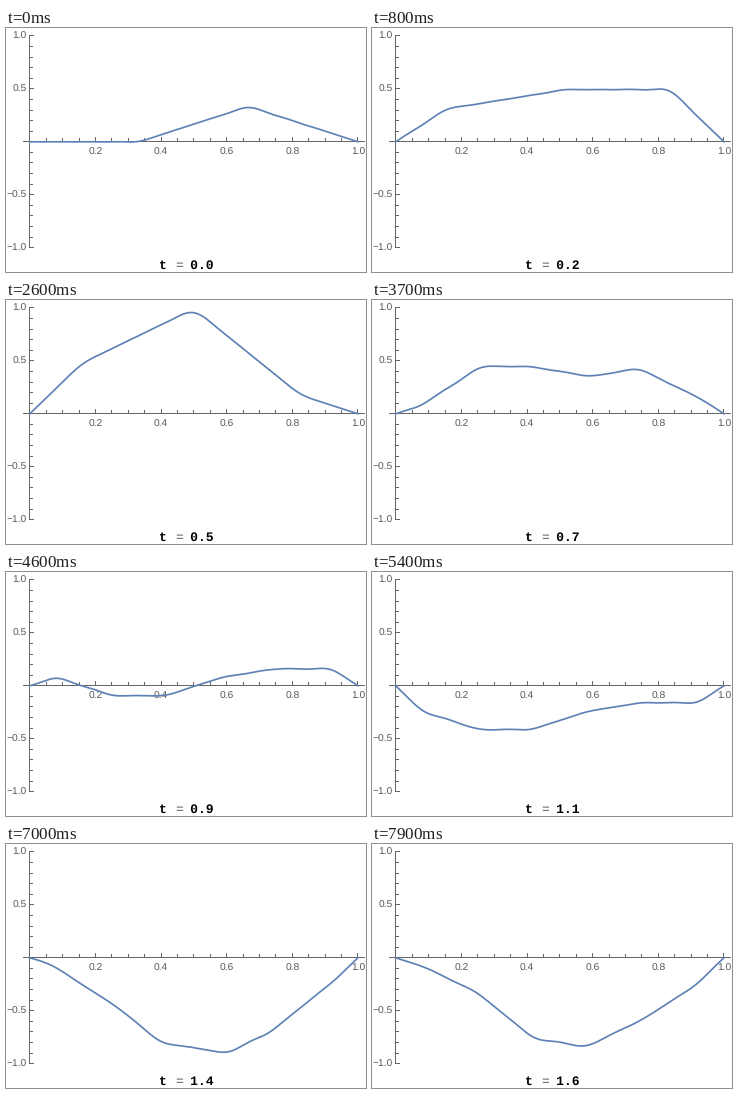
Write a matplotlib script that moves like this. It is 360 px wide and 244 px high and loops after 8000 ms.

```python
import numpy as np
import matplotlib.pyplot as plt
from matplotlib.animation import FuncAnimation

W, H, DPI = 360, 244, 100
FRAMES, STEP_MS, DT = 80, 100, 0.02
TERMS = 20
X0, X1, Y0, UNIT = 23.8, 351.9, 113.8, 105.9
GRAY, INK, BLUE = "#666666", "#585858", "#5e81b5"

plt.rcParams["text.hinting"] = "no_hinting"


def pt(px):
    return px * 72 / DPI


def sx(x):
    return X0 + (X1 - X0) * x


def sy(y):
    return Y0 - UNIT * y


def mid(v):
    """Centre of the pixel that holds v."""
    return np.floor(v) + 0.5


# Fourier solution of the plucked string with initial velocity 2
n = np.arange(1, TERMS + 1)
k = n * np.pi
shape = 2 / k**2 * (2 * np.sin(2 * k / 3) - np.sin(k / 3))
speed = 4 * (1 - np.cos(k)) / k**2
x = np.linspace(0, 1, 401)
modes = np.sin(np.outer(x, k))


def string(t):
    return modes @ (shape * np.cos(k * t) + speed * np.sin(k * t))


fig = plt.figure(figsize=(W / DPI, H / DPI), dpi=DPI, facecolor="white")
ax = fig.add_axes([0, 0, 1, 1])
ax.set_xlim(0, W)
ax.set_ylim(H, 0)
ax.axis("off")


def hline(y, x0, x1):
    ax.plot([x0, x1], [mid(y)] * 2, color=GRAY, lw=pt(1),
            solid_capstyle="butt", snap=False)


def vline(x, y0, y1):
    ax.plot([mid(x)] * 2, [y0, y1], color=GRAY, lw=pt(1),
            solid_capstyle="butt", snap=False)


def label(px, py, text, ha):
    ax.text(px, py, text, family="Liberation Sans", size=pt(10.2),
            color=INK, ha=ha, va="baseline")


def mono(px, text, **style):
    return ax.text(px, 241, text, family="Liberation Mono", size=pt(13),
                   ha="center", va="baseline", **style)


ax_x, ax_y = np.floor(X0), np.floor(Y0)
hline(Y0, ax_x - 6, 359)
vline(X0, np.floor(sy(1)), np.floor(sy(-1)) + 1)

for i in range(1, 21):
    major = i % 4 == 0
    vline(sx(i / 20), ax_y, ax_y - (4 if major else 3))
    if major:
        label(sx(i / 20), 127, f"{i / 20:.1f}", "center")

for i in range(-10, 11):
    major = i % 5 == 0
    hline(sy(i / 10), ax_x + 1, ax_x + (5 if major else 4))
    if major and i:
        label(20.5, mid(sy(i / 10)) + 3.5,
              f"{i / 10:.1f}".replace("-", "\u2212"), "right")

curve, = ax.plot([], [], color=BLUE, lw=pt(1.7), zorder=3)
mono(172.7, "=", color="#555555")
caption = mono(180.5, "", weight="bold", color="black")


def draw(frame):
    t = frame * DT
    curve.set_data(sx(x), sy(string(t)))
    caption.set_text(f"t   {t:.1f}")
    return curve, caption


anim = FuncAnimation(fig, draw, frames=FRAMES, interval=STEP_MS,
                     repeat=True, repeat_delay=0)
plt.show()
```
